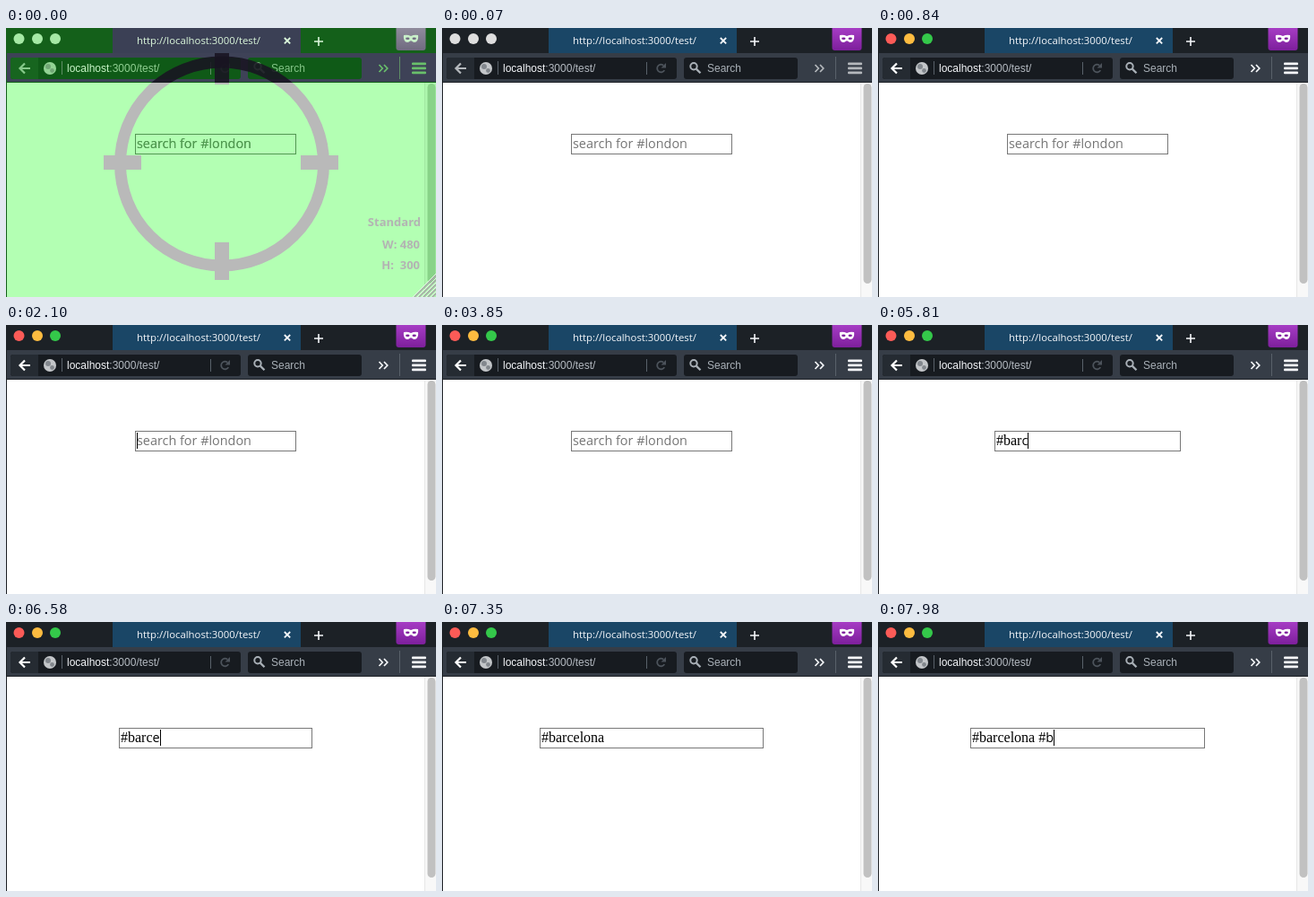
An HTML page with a canvas for the animation above (8000 ms loop, 480 by 300 pixels).

```html
<!DOCTYPE html>
<html lang="en">
<head>
<meta charset="utf-8">
<title>Search field</title>
<style>
html, body { margin: 0; width: 480px; height: 300px; overflow: hidden; background: #fff; }
canvas { display: block; width: 480px; height: 300px; }
</style>
</head>
<body>
<canvas id="stage"></canvas>
<script>
const LOOP = 8000;
const SANS = '"Open Sans", "Noto Sans", sans-serif';
const ARIAL = '"Liberation Sans", Arial, sans-serif';
const SERIF = '16px "Liberation Serif", Times, serif';
const FIELD_SANS = '14.4px ' + SANS;

const canvas = document.getElementById('stage');
const ctx = canvas.getContext('2d');
const dpr = window.devicePixelRatio || 1;
canvas.width = 480 * dpr;
canvas.height = 300 * dpr;

const normal = {
  strip: '#1c2126', tab: '#1a4666', bar: '#363d47', edge: '#1b1f24',
  field: '#171b20', back: '#252b32', line: '#59616a', page: '#fff',
  title: '#f5f7fa', host: '#f5f7fa', path: '#b4bac1', hint: '#a9b0b7',
  icon: '#c3c6c9', reload: '#4c535b', lights: ['#dedede', '#dedede', '#dedede'],
  mask: '#fff', badge: ['#a63cc4', '#7d1f9c'], track: '#f8f8f8', rim: '#e6e6e6',
  thumb: '#c1c1c1', box: '#777', ghost: '#757575'
};
const idle = { ...normal, arrow: '#b4b8bc', menu: '#b4b8bc' };
const active = {
  ...normal, arrow: '#fff', menu: '#f5f7fa',
  lights: ['#fc5b57', '#fdbc40', '#34c84a']
};
const green = {
  ...normal, strip: '#14601a', tab: '#3b4055', bar: '#3e4257', edge: '#14601a',
  field: '#0f5a17', back: '#17651f', line: '#5f8f66', page: '#b3ffb3',
  title: '#dcf8dc', host: '#c8f5c8', path: '#90cf92', hint: '#84c588',
  icon: '#92d394', reload: '#56825c', arrow: '#86c98a', menu: '#69bf6b',
  lights: ['#a5e9a5', '#a5e9a5', '#a5e9a5'], mask: '#c9f0c9',
  badge: ['#8f8b9c', '#706b80'], track: '#adf7ad', rim: '#a1e8a1',
  thumb: '#88d388', box: '#539653', ghost: '#529a52'
};

// [time, serif part, freshly typed part, text that sets the field width]
const typing = [
  [0, '', '', ''],
  [5110, '', '#', ''],
  [5180, '', '#b', ''],
  [5250, '#b', '', '#b'],
  [5390, '#b', 'a', '#b'],
  [5530, '#bar', '', '#bar'],
  [5810, '#bar', 'c', '#bar'],
  [5950, '#barc', '', '#barc'],
  [6580, '#barc', 'e', '#barc'],
  [6650, '#barc', 'elo', '#barc'],
  [6720, '#barcelona', '', '#barcelona'],
  [7490, '#barcelona ', '', '#barcelona'],
  [7560, '#barcelona #', '', '#barcelona #'],
  [7980, '#barcelona #', 'b', '#barcelona #']
];
const blinks = [910, 1470, 2100, 2660, 3290, 3850, 4480, 5040, 5110, 7350, 7490];

function rect(x, y, w, h, color) {
  ctx.fillStyle = color;
  ctx.fillRect(x, y, w, h);
}
function round(x, y, w, h, r, color) {
  ctx.fillStyle = color;
  ctx.beginPath();
  ctx.roundRect(x, y, w, h, r);
  ctx.fill();
}
function disc(x, y, r, color) {
  ctx.fillStyle = color;
  ctx.beginPath();
  ctx.arc(x, y, r, 0, 7);
  ctx.fill();
}
function stroke(color, width, ...lines) {
  ctx.strokeStyle = color;
  ctx.lineWidth = width;
  ctx.beginPath();
  for (const [x, y, ...rest] of lines) {
    ctx.moveTo(x, y);
    for (let i = 0; i < rest.length; i += 2) ctx.lineTo(rest[i], rest[i + 1]);
  }
  ctx.stroke();
}
function text(str, x, y, font, color) {
  ctx.font = font;
  ctx.fillStyle = color;
  ctx.fillText(str, x, y);
  return x + ctx.measureText(str).width;
}
function width(str) {
  ctx.font = SERIF;
  return ctx.measureText(str).width;
}

function badge(c) {
  const fill = ctx.createLinearGradient(0, 0, 0, 25);
  fill.addColorStop(0, c.badge[0]);
  fill.addColorStop(1, c.badge[1]);
  round(435.5, -4, 33, 29, 3, fill);
  ctx.fillStyle = c.mask;
  ctx.beginPath();
  ctx.moveTo(444, 8);
  ctx.quadraticCurveTo(448, 7, 452, 9);
  ctx.quadraticCurveTo(456, 7, 460, 8);
  ctx.bezierCurveTo(461, 14, 457, 18, 453.5, 15);
  ctx.quadraticCurveTo(452, 13.5, 450.5, 15);
  ctx.bezierCurveTo(447, 18, 443, 14, 444, 8);
  ctx.fill();
  ctx.fillStyle = c.badge[1];
  for (const x of [448.3, 455.7]) {
    ctx.beginPath();
    ctx.ellipse(x, 11.8, 2.2, 1.2, 0, 0, 7);
    ctx.fill();
  }
}

function tabs(c) {
  rect(0, 0, 480, 29, c.strip);
  rect(119, 0, 210, 28, c.tab);
  [14.5, 35, 55].forEach((x, i) => disc(x, 12, 6, c.lights[i]));
  text('http://localhost:3000/test/', 146, 18, '11.35px ' + SANS, c.title);
  stroke(c.title, 1.8, [310.8, 11, 317.2, 17.4], [317.2, 11, 310.8, 17.4]);
  stroke(c.title, 1.6, [344, 15, 354, 15], [349, 10, 349, 20]);
  badge(c);
}

function toolbar(c, hover) {
  rect(0, 28, 480, 33, c.bar);
  rect(0, 60, 480, 1, c.edge);
  round(5, 33, 257, 24, 3, c.field);
  round(5, 33, 31, 24, [3, 0, 0, 3], c.back);
  stroke(c.arrow, 2.2, [15.5, 45, 27, 45], [21, 39.5, 15.5, 45, 21, 50.5]);

  disc(49, 45, 7, c.icon);
  ctx.fillStyle = c.path;
  ctx.globalAlpha = 0.55;
  disc(47, 43, 3, c.reload);
  disc(51.5, 47.5, 2.4, c.reload);
  ctx.globalAlpha = 1;

  rect(62, 37, 1, 15, c.line);
  const end = text('localhost', 68, 49, '12px ' + ARIAL, c.host);
  text(':3000/test/', end, 49, '12px ' + ARIAL, c.path);
  rect(228, 38, 1, 14, c.line);

  ctx.strokeStyle = c.reload;
  ctx.lineWidth = 1.8;
  ctx.beginPath();
  ctx.arc(244.5, 45, 4.3, 0.5, 5.4);
  ctx.stroke();
  ctx.fillStyle = c.reload;
  ctx.beginPath();
  ctx.moveTo(250, 39);
  ctx.lineTo(250, 44.5);
  ctx.lineTo(244.5, 44.5);
  ctx.fill();

  round(270, 33, 127, 24, 3, c.field);
  const lens = hover ? '#f0f2f4' : c.hint;
  ctx.strokeStyle = lens;
  ctx.lineWidth = 2;
  ctx.beginPath();
  ctx.arc(281, 42.8, 3.7, 0, 7);
  ctx.stroke();
  stroke(lens, 2.3, [283.8, 45.6, 288.5, 50.3]);
  text('Search', 296, 49, '12px ' + ARIAL, c.hint);

  stroke(c.menu, 1.7, [416.5, 41, 420.3, 45, 416.5, 49], [422, 41, 425.8, 45, 422, 49]);
  rect(439, 32, 1, 25, c.line);
  for (const y of [38.5, 43.5, 48.5]) round(453, y, 16, 2.8, 1, c.menu);
}

function field(c, t) {
  let now = typing[0];
  for (const step of typing) if (step[0] <= t) now = step;
  const [, done, fresh, sized] = now;
  const w = 180 + Math.round(width(sized) / 2) * 2;
  const x = 234 - w / 2;
  ctx.strokeStyle = c.box;
  ctx.lineWidth = 1;
  ctx.strokeRect(x + 0.5, 118.5, w - 1, 22);

  let end = x + 2;
  if (done || fresh) {
    end = text(done, end, 134, SERIF, '#000');
    end = text(fresh, end, 134, FIELD_SANS, '#000');
  } else {
    text('search for #london', end, 134, FIELD_SANS, c.ghost);
  }
  const flips = blinks.filter(b => b <= t).length;
  if (flips % 2) rect(Math.round(end), 120, 1, 18, '#000');
}

function page(c, t) {
  rect(0, 61, 480, 239, c.page);
  rect(0, 28, 1, 272, c.edge);
  rect(467, 61, 13, 239, c.track);
  rect(467, 61, 1, 239, c.rim);
  round(470.5, 62, 9, 223, 4.5, c.thumb);
  field(c, t);
}

function crosshair() {
  const shape = color => {
    ctx.strokeStyle = color;
    ctx.lineWidth = 13;
    ctx.beginPath();
    ctx.arc(241, 151.5, 113.5, 0, 7);
    ctx.stroke();
    rect(109, 142, 42, 16, color);
    rect(329, 142, 42, 16, color);
    rect(233, 21, 16, 42, color);
    rect(233, 239, 16, 42, color);
  };
  const clipped = (y, h, color) => {
    ctx.save();
    ctx.beginPath();
    ctx.rect(0, y, 480, h);
    ctx.clip();
    shape(color);
    ctx.restore();
  };
  clipped(28, 33, 'rgba(24,20,34,.88)');
  clipped(61, 239, '#b9b9b9');

  ctx.textAlign = 'right';
  const font = 'bold 13px ' + SANS;
  text('Standard', 463, 221, font, '#b3b3b3');
  text('W: 480', 462, 246, font, '#b3b3b3');
  text('H:  300', 462, 269, font, '#b3b3b3');
  ctx.textAlign = 'left';
  for (let d = 4; d < 27; d += 5) {
    stroke('#a9a9a9', 1.6, [480 - d, 300, 480, 300 - d]);
    stroke('#e3f5e3', 1, [478 - d, 300, 480, 298 - d]);
  }
}

function draw(t) {
  const c = t < 70 ? green : t < 840 ? idle : active;
  ctx.setTransform(dpr, 0, 0, dpr, 0, 0);
  page(c, t);
  tabs(c);
  toolbar(c, t >= 490 && t < 560);
  rect(0, 28, 1, 33, c.edge);
  if (t < 70) {
    crosshair();
    // Labels stay readable above the ring.
    text('search for #london', 146, 134, FIELD_SANS, c.ghost);
  }
}

const start = performance.now();
function tick() {
  draw((performance.now() - start) % LOOP);
  requestAnimationFrame(tick);
}
tick();
</script>
</body>
</html>
```
